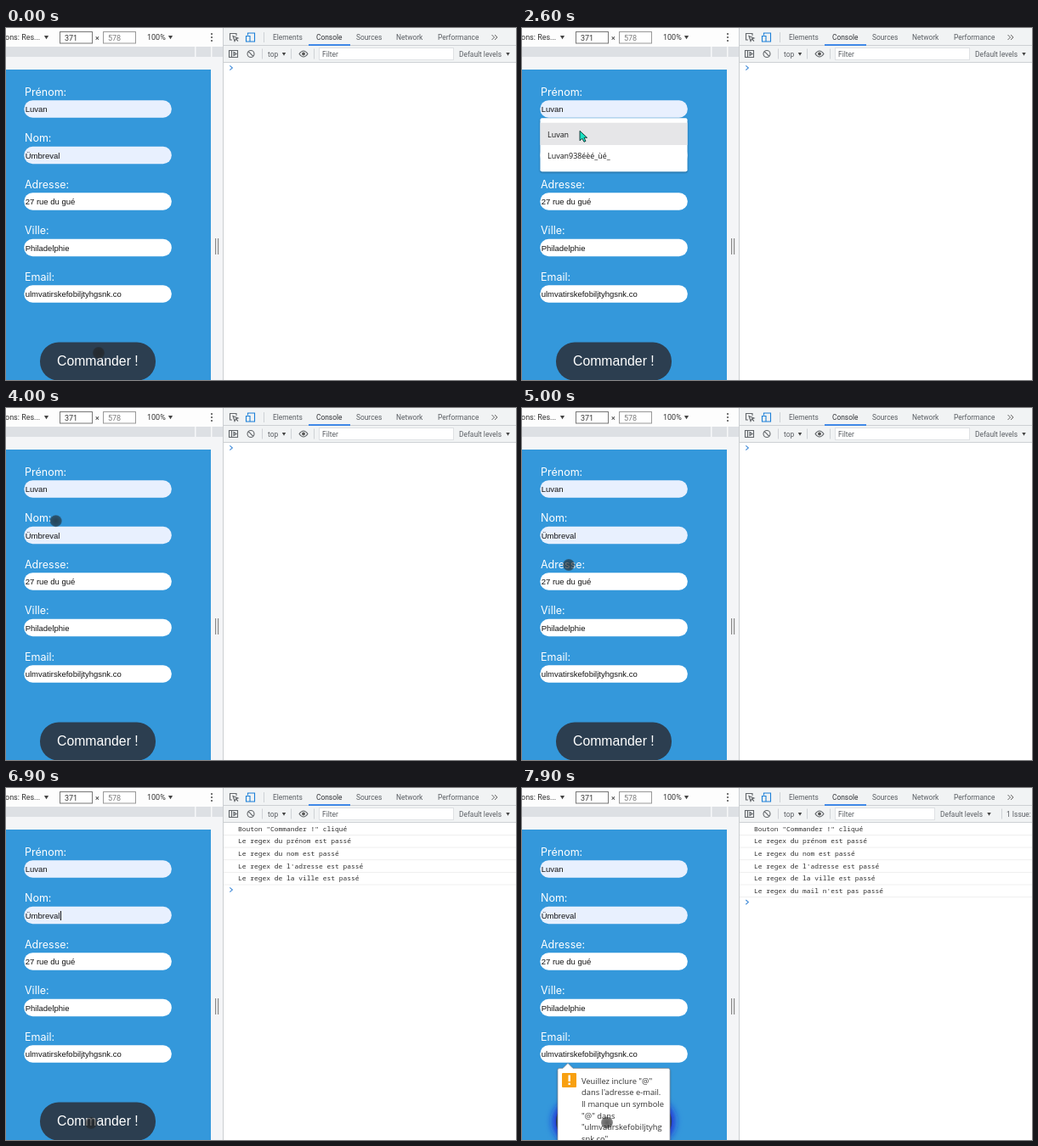
Animation of 600x415 px, one loop 8000 ms. Source, as an HTML page:

```html
<!DOCTYPE html>
<html lang="fr">
<head>
<meta charset="utf-8">
<style>
html, body { margin: 0; width: 100%; height: 100%; overflow: hidden; background: #fff; }
svg { display: block; width: 600px; height: 415px; }
text { white-space: pre; }
.ui { font: 8.4px Roboto, sans-serif; fill: #5a5e63; }
.dark { fill: #303236; }
.size { font: 9px Roboto, sans-serif; fill: #333; }
.label { font: 400 12.5px Inter, sans-serif; fill: #fff; }
.value { font: 9.5px "Liberation Sans", Arial, sans-serif; fill: #111; }
.button { font: 15.8px "Liberation Sans", Arial, sans-serif; fill: #fff; }
.log { font: 7.93px "Noto Sans Mono", monospace; fill: #303030; }
.option { font: 8.9px "Noto Sans", sans-serif; fill: #222; }
.bubble { font: 9.35px "Open Sans", sans-serif; fill: #333; }
.icon { fill: none; stroke: #62666a; stroke-width: 1.1; }
</style>
</head>
<body>
<svg viewBox="0 0 600 415">
  <defs>
    <filter id="blur" x="-30%" y="-60%" width="160%" height="220%"><feGaussianBlur stdDeviation="5"/></filter>
    <filter id="drop" x="-10%" y="-10%" width="120%" height="130%"><feDropShadow dx="0" dy="1" stdDeviation="1.2" flood-opacity=".4"/></filter>
    <radialGradient id="finger">
      <stop offset="0" stop-color="#222" stop-opacity=".72"/>
      <stop offset=".8" stop-color="#222" stop-opacity=".6"/>
      <stop offset="1" stop-color="#222" stop-opacity=".45"/>
    </radialGradient>
  </defs>
  <g id="page"></g>
  <g id="tools"></g>
  <g id="logs"></g>
  <g id="menu"></g>
  <g id="alert"></g>
  <circle id="touch" r="7" fill="url(#finger)"/>
  <path id="arrow" d="M0 0V11.5L2.8 9L5 13L7 12L5 8H8.6Z" fill="#19e0c0" stroke="#14302f" stroke-width=".9"/>
</svg>
<script>
const $ = id => document.getElementById(id);
const text = (x, y, s, cls) => `<text x="${x}" y="${y}" class="${cls}">${s}</text>`;
const rect = (x, y, w, h, fill, more = '') =>
  `<rect x="${x}" y="${y}" width="${w}" height="${h}" fill="${fill}" ${more}/>`;
const path = (d, more = 'class="icon"') => `<path d="${d}" ${more}/>`;
const down = (x, y, s = 2.6) => path(`M${x - s} ${y - s * .8}h${2 * s}l${-s} ${s * 1.7}z`, 'fill="#444"');
const line = (x, y) => rect(x, y, 1, 12, '#cfd2d6');

const first = 'Luvan', mail = 'ulmvatirskefobiljtyhgsnk.co';
const fields = [['Prénom:', first], ['Nom:', 'Ümbreval'], ['Adresse:', '27 rue du gué'],
  ['Ville:', 'Philadelphie'], ['Email:', mail]];
const messages = ['Bouton "Commander !" cliqué', 'Le regex du prénom est passé', 'Le regex du nom est passé',
  "Le regex de l'adresse est passé", 'Le regex de la ville est passé', "Le regex du mail n'est pas passé"];
const pill = 'rx="22"';

$('page').innerHTML =
  rect(0, 0, 255, 22, '#fdfdfd') + rect(0, 22, 255, 12, '#dde0e4') +
  rect(222, 22, 1.5, 12, '#f7f8f9') + rect(241, 22, 1.5, 12, '#f7f8f9') +
  rect(0, 34, 255, 381, '#f4f5f7') + rect(0, 49, 241, 366, '#3498db') +
  text(-1, 14, 'ons: Res...', 'size') + down(47.5, 11) +
  rect(63.5, 4.5, 38, 13.5, '#fff', 'stroke="#777"') + text(69, 14.5, '371', 'size') +
  text(105, 14.5, '×', 'size') +
  rect(114.5, 4.5, 38, 13.5, '#fff', 'stroke="#999"') + text(120, 14.5, '578', 'size" opacity=".65') +
  text(166, 14, '100%', 'size') + down(193.5, 11) +
  [7, 11, 15].map(y => `<circle cx="242" cy="${y}" r="1.1" fill="#555"/>`).join('') +
  rect(246, 248, 1.2, 19, '#888') + rect(249, 248, 1.2, 19, '#888') +
  fields.map(([name, value], i) => {
    const y = 54.5 * i;
    return text(22, 79.8 + y, name, 'label') +
      rect(21.3, 85.2 + y, 173.5, 20.5, i < 2 ? '#e8f0fe' : '#fff', 'rx="10"') + text(22.7, 99.1 + y, value, 'value');
  }).join('') +
  `<rect id="caret" x="64" y="145" width="1" height="11" fill="#111"/>` +
  rect(40, 371, 136, 44.5, '#1a1ad8', pill + ' id="glow" filter="url(#blur)" stroke="#1a1ad8" stroke-width="6"') +
  rect(40, 370.6, 136, 45, '#2c3e50', pill) + text(60, 398, 'Commander !', 'button');

function tools(issue) {
  const shift = issue ? -41 : 0;
  return rect(255, 0, 345, 40.5, '#f1f3f4') + rect(255, 0, 1, 415, '#cbced1') +
    rect(256, 20, 344, 1, '#cdd0d4') + rect(256, 40, 344, 1, '#cdd0d4') +
    path('M271 9V6.5H263.5V14H266M267 9.5L273 12L270.3 13L269 15.5Z M270 12.5L273 15.5') +
    path('M284.5 8.5V6H292.5V16H287.5M282.5 9.5H287V16H282.5Z', 'fill="none" stroke="#1a7fd8" stroke-width="1.1"') +
    line(303, 5) +
    [[314, 'Elements'], [365, 'Console'], [412, 'Sources'], [459, 'Network'], [508, 'Performance']]
      .map(([x, s]) => text(x, 14.2, s, s == 'Console' ? 'ui dark' : 'ui')).join('') +
    path('M571.5 8l3 3l-3 3M575 8l3 3l-3 3', 'fill="none" stroke="#666"') +
    rect(356, 19.2, 49, 1.6, '#1a73e8') +
    path('M262.5 26.5H272.5V34.5H262.5Z M265.5 26.5V34.5M268 28.5L271 30.5L268 32.5Z') +
    path('M284 30.5a4 4 0 1 0 8 0a4 4 0 1 0-8 0M285.2 27.7L290.8 33.3') +
    line(301, 24.5) + text(308, 33.5, 'top', 'ui') + down(327, 30.8, 2.2) + line(335, 24.5) +
    path('M345 30.5Q350 23.5 355 30.5Q350 37.5 345 30.5Z') + '<circle cx="350" cy="30.5" r="1.9" fill="#555"/>' +
    line(362, 24.5) + rect(368.5, 23.5, 158 + shift, 14, '#fff', 'stroke="#dfe1e4"') +
    text(372, 33.9, 'Filter', 'ui') +
    text(533 + shift, 33.5, 'Default levels', 'ui') + down(590.5 + shift, 30.8, 2.2) +
    (issue ? line(564, 24.5) + text(570, 33.5, '1 Issue:', 'ui') : '');
}

function logs(count) {
  const y = 47 + 14.6 * count;
  return messages.slice(0, count).map((s, i) =>
    text(273, 50.7 + 14.65 * i, s, 'log') + rect(256, 55 + 14.65 * i, 344, .8, '#ececec')).join('') +
    path(`M263.3 ${y - 2.6}l3 2.6l-3 2.6`, 'fill="none" stroke="#4a90d9" stroke-width="1.2"');
}

$('menu').innerHTML =
  rect(21.5, 106.3, 173, 63, '#fff', 'rx="2" filter="url(#drop)"') + rect(21.5, 111.7, 173, 26.3, '#e6e6e8') +
  text(30, 128.5, first, 'option') + text(30, 154.4, first + '938éèé_ùé_', 'option');

const bubble = ['Veuillez inclure "@"', "dans l'adresse e-mail.", 'Il manque un symbole', '"@" dans',
  '"' + mail.slice(0, 21), mail.slice(21) + '".'];
$('alert').innerHTML =
  path('M44 330.5H48L54 324.5L60 330.5H172Q174 330.5 174 332.5V420H42V332.5Q42 330.5 44 330.5Z',
    'fill="#fff" stroke="#8c8f94" stroke-width=".7" filter="url(#drop)"') +
  rect(47, 336, 17, 17, '#f8a010', 'rx="1"') + rect(54.5, 338.5, 2.4, 7.5, '#fff') + rect(54.5, 347.6, 2.4, 2.4, '#fff') +
  bubble.map((s, i) => text(70, 348.6 + 13.7 * i, s, 'bubble')).join('');

// pointer stops: time, x, y
const stops = [[0, 109, 383], [900, 105, 390], [1100, 100, 385], [1500, 53, 180], [1900, 57, 103], [2200, 62, 95],
  [2600, 68, 121.3], [3000, 66, 125], [3400, 60, 126.3], [3900, 59, 130], [4300, 57, 150], [4600, 56, 153],
  [5000, 55, 185], [5500, 63, 262], [6300, 98, 394], [6800, 100, 395], [8000, 100, 394.5]];

function pointer(t) {
  const i = stops.findIndex(s => s[0] > t);
  const a = stops[i - 1], b = stops[i];
  const k = (t - a[0]) / (b[0] - a[0]), e = k * k * (3 - 2 * k);
  return [a[1] + (b[1] - a[1]) * e, a[2] + (b[2] - a[2]) * e];
}

const show = (id, on) => $(id).style.display = on ? '' : 'none';
let state;

function frame(now) {
  const t = Math.floor(now % 8000 / 100) * 100;
  const sent = t >= 7000;
  const count = sent ? 6 : t >= 6900 ? 5 : 0;
  if (state !== count) {
    state = count;
    $('tools').innerHTML = tools(sent);
    $('logs').innerHTML = logs(count);
  }
  const open = t >= 2300 && t < 3900;
  show('menu', open);
  show('caret', t >= 4500 && !sent && (t - 4500) % 1000 < 500);
  show('glow', sent);
  show('alert', sent);
  $('alert').style.opacity = Math.min(1, (t - 6900) / 300);
  show('arrow', open);
  show('touch', !open);
  const place = `translate(${pointer(t)})`;
  $('touch').setAttribute('transform', place);
  $('arrow').setAttribute('transform', place);
  requestAnimationFrame(frame);
}
requestAnimationFrame(frame);
</script>
</body>
</html>
```
